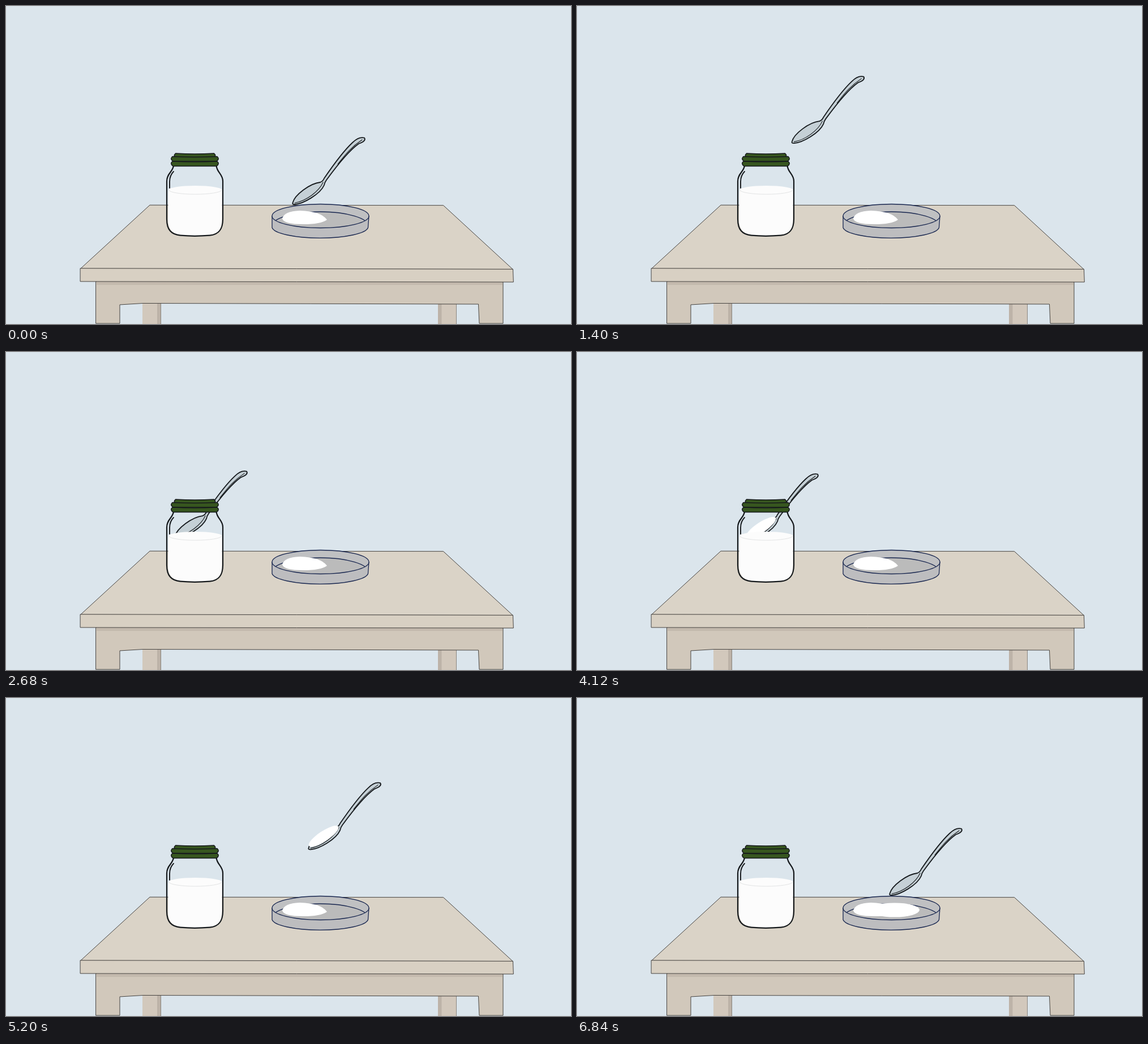
An HTML page with a canvas that plays this animation: 998x561 px, repeating every 6.88 s.

```html
<!DOCTYPE html>
<html lang="en">
<head>
<meta charset="utf-8">
<title>Spoon and jar</title>
<style>
html, body { margin: 0; width: 100%; height: 100%; overflow: hidden; background: #dbe5ec; }
canvas { display: block; width: 998px; height: 561px; }
</style>
</head>
<body>
<canvas id="stage" width="998" height="561"></canvas>
<script>
const ctx = document.getElementById('stage').getContext('2d');
const LOOP = 6880, STEP = 40;
const INK = '#15191c', NAVY = '#18264f', EDGE = '#45423f', GREEN = '#37561f';

const span = (t, a, b) => Math.max(0, Math.min(1, (t - a) / (b - a)));
const mix = (a, b, u) => a + (b - a) * u;

function smooth(t, a, b) {
  const u = span(t, a, b);
  return u * u * (3 - 2 * u);
}

// Ease in and out, with a steeper middle than smooth().
function swing(t, a, b) {
  const u = span(t, a, b);
  return u < 0.5 ? (2 * u) ** 2.5 / 2 : 1 - (2 - 2 * u) ** 2.5 / 2;
}

// Offset of the spoon: arc into the jar, dip, rise, carry across, lower.
function spoonAt(t) {
  const out = swing(t, 0, 2560), carry = swing(t, 4592, 5380);
  const arc = -150 * out - 50 * out ** 2 + 178 * out ** 9;
  return {
    x: -208 * out + 254 * carry,
    y: arc + 5 * smooth(t, 2560, 4100) - 103 * smooth(t, 4160, 4840) + 118 * smooth(t, 4840, 5800)
  };
}

const svg = d => new Path2D(d);

function oval(x, y, rx, ry, turn = 0) {
  const p = new Path2D();
  p.ellipse(x, y, rx, ry, turn, 0, 2 * Math.PI);
  return p;
}

function paint(path, fill, line, width) {
  if (fill) { ctx.fillStyle = fill; ctx.fill(path); }
  if (line) { ctx.strokeStyle = line; ctx.lineWidth = width; ctx.stroke(path); }
}

function rect(x, y, w, h, color) {
  ctx.fillStyle = color;
  ctx.fillRect(x, y, w, h);
}

function table() {
  for (const [x, shade] of [[241, 267], [763, 763]]) {
    rect(x, 524, 32.5, 37, '#d2c8bc');
    rect(shade, 524, 6.5, 37, '#bdb3a8');
    paint(svg(`M${x + 32.5} 525V561`), null, '#77716b', 0.8);
  }
  paint(svg('M159 486L878 487V560H836L834.5 526L242 524.5L201 527V560H159Z'), '#d1c8bb', EDGE, 1);
  rect(160, 486, 717, 6, '#c3b9ad');
  paint(svg('M132 463L254 351.2L772.5 351.7L895 464.3Z'), '#dad3c7', EDGE, 1);
  paint(svg('M131.5 462.8L895.5 464.3L896.3 487L131.5 486Z'), '#d8d0c3', EDGE, 1);
}

function dish() {
  const rim = oval(555.5, 370.5, 85.5, 21);
  paint(svg('M470 370.5V391A85 19.8 0 0 0 639.5 391L641 370.5Z'), '#bdbdbf', NAVY, 1.3);
  paint(rim, '#bfc0c2');
  ctx.save();
  ctx.clip(rim);
  paint(oval(555, 388, 85, 25), '#bbbbbb', NAVY, 1.3);
  ctx.restore();
  paint(rim, null, NAVY, 1.3);
  paint(svg('M488 375Q491 362 519 361Q556 362 567 377Q556 385 525 385Q490 385 488 375Z'), '#fff');
}

// Powder fills the spoon, then slides off and settles beside the pile.
function powder(t) {
  const { x, y } = spoonAt(t), u = smooth(t, 5800, 6440);
  ctx.globalAlpha = smooth(t, 3240, 3640);
  paint(oval(mix(533 + x, 561, u), mix(326.5 + y, 374, u),
    mix(31, 44, u), mix(9, 12.6, u), mix(-0.58, 0, u)), '#fff');
  ctx.globalAlpha = 1;
}

function spoon(t) {
  const { x, y } = spoonAt(t);
  ctx.save();
  ctx.translate(x, y);
  paint(svg('M506.5 347C510 333 537 313 555 311Q560 309 562 304C575 285 597 255 612 241' +
    'Q623 230 633 232.5Q637 238 623 243C606 255 585 281 566 307Q563 311 562 316' +
    'C555 332 525 349 510 350Q505 350 506.5 347Z'), '#c5d0d6', INK, 1.8);
  paint(svg('M510 347.5C530 344 553 327 560 311M629 236C608 250 598 264 586 279'), null, INK, 1.1);
  ctx.restore();
}

function jar() {
  paint(svg('M287 324.5A46.8 7.5 0 0 1 381.5 324.5V379C381 394 374 403 360 404Q333 406 308 404C293 402 286.5 393 286 378Z'), '#fcfcfc');
  paint(svg('M287.5 325A46.8 7.5 0 0 0 381 325'), null, '#dfe0e1', 0.9);
  paint(svg('M296 282C294 293 284 296 284 309V376C284 395 292 403 308 404.7Q333 407 360 404.7C376 403 383 394 383 376V309C383 297 373 294 371.5 282'), null, INK, 2.2);
  paint(svg('M296 292C291 297 289 303 289 310V321'), null, INK, 1.9);
  [297.5, 292, 292].forEach((x, i) => {
    const y = [260, 265.5, 274][i], r = 667 - x;
    paint(svg(`M${x + 2} ${y}Q333.5 ${y + 2} ${r - 2} ${y}Q${r + 3} ${y + 4} ${r - 3} ${y + 8.5}H${x + 3}Q${x - 3} ${y + 4} ${x + 2} ${y}Z`),
      GREEN, INK, 1.5);
  });
}

function draw(t) {
  rect(0, 0, 998, 561, '#dbe5ec');
  table();
  if (t < 5800) {
    spoon(t);
    powder(t);
    dish();
  } else {
    spoon(t);
    dish();
    powder(t);
  }
  jar();
}

ctx.lineJoin = ctx.lineCap = 'round';
const start = performance.now();
function tick() {
  const t = (performance.now() - start) % LOOP;
  draw(Math.floor(t / STEP) * STEP);
  requestAnimationFrame(tick);
}
tick();
</script>
</body>
</html>
```
